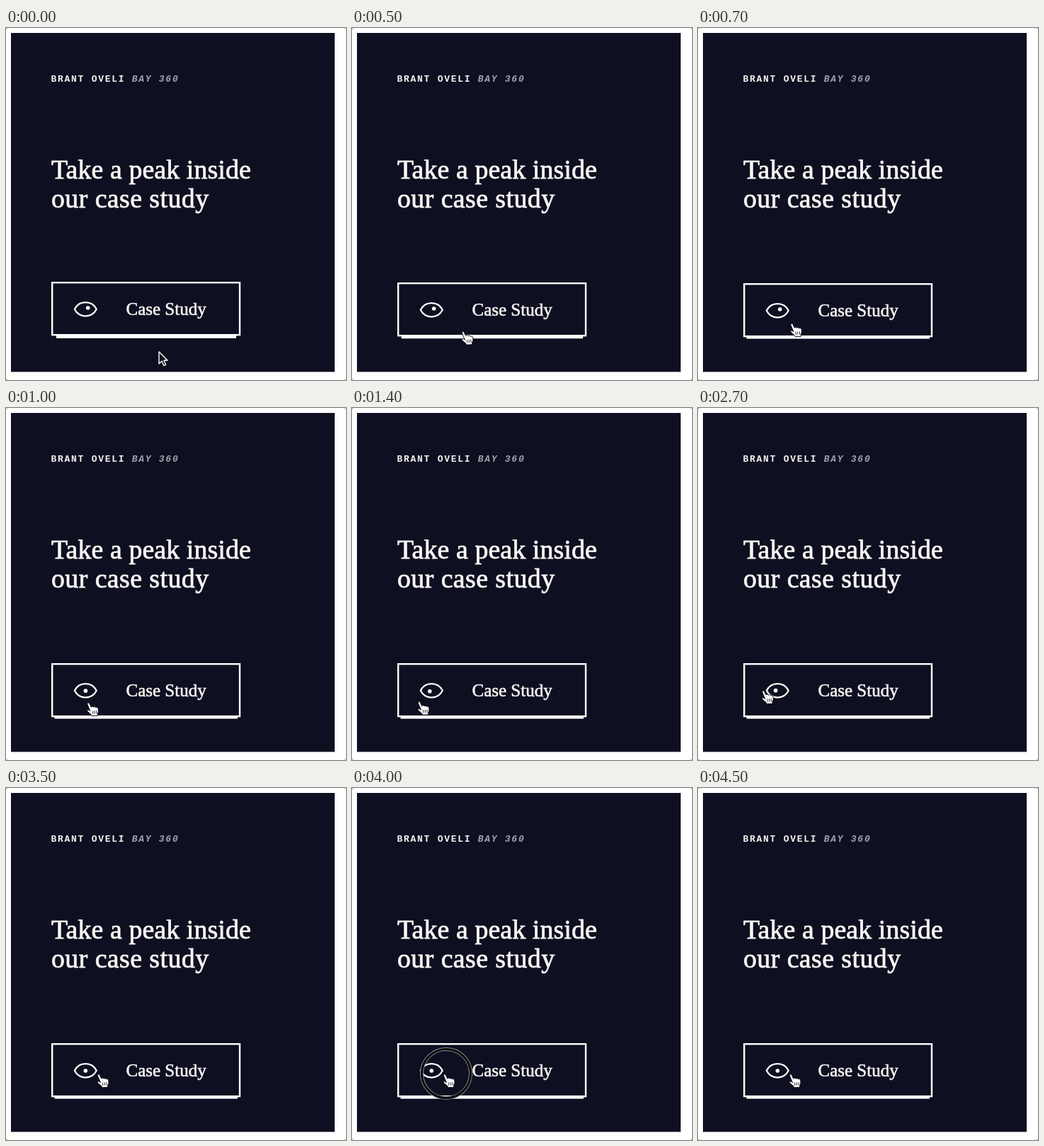
Write an HTML page that moves like this. It is 480 px wide and 498 px high and loops after 4.8 s.

```html
<!DOCTYPE html>
<html lang="en">
<head>
<meta charset="utf-8">
<title>Case study button</title>
<style>
  html, body { margin: 0; width: 100%; height: 100%; overflow: hidden; background: #b4b4b4; }
  svg { display: block; width: 100vw; height: 100vh; }
  text { fill: #f7f5f3; }
  .tag { font: 700 13px "Liberation Mono", "Courier New", monospace; letter-spacing: 1.72px; }
  .tag .sub { font-style: italic; fill: #a3a3ae; }
  .title, .label { font-family: "Liberation Serif", "Times New Roman", serif; stroke: #f7f5f3; }
  .title { font-size: 37.8px; stroke-width: .8; letter-spacing: .12px; }
  .title.second { letter-spacing: .45px; }
  .label { font-size: 25px; stroke-width: .6; }
</style>
</head>
<body>
<svg viewBox="0 0 480 498">
  <rect width="480" height="498" rx="4" fill="#fff"/>
  <rect x="7" y="7" width="457" height="479.5" fill="#0e0f20"/>

  <text class="tag" x="63.5" y="76" xml:space="preserve">BRANT OVELI <tspan class="sub">BAY 360</tspan></text>
  <text class="title" x="64" y="212.5">Take a peak inside</text>
  <text class="title second" x="64" y="254">our case study</text>

  <rect id="shade" y="435" fill="#fff"/>
  <g id="button">
    <rect x="65.2" y="360.2" width="264.8" height="74" fill="#0e0f20" stroke="#fff" stroke-width="2.4"/>
    <text class="label" x="169.5" y="405.5">Case Study</text>
    <g transform="translate(112.3 397.8)">
      <path d="M-15.5 0C-9-13 9-13 15.5 0C9 13-9 13-15.5 0Z" fill="none" stroke="#fff" stroke-width="2.2" stroke-linejoin="round"/>
      <circle id="pupil" r="2.8" fill="#fff"/>
    </g>
  </g>

  <g id="ring" fill="none">
    <circle cx="133" cy="404" r="34.5" stroke="#8d8d96" stroke-width="5"/>
    <circle cx="133" cy="404" r="34.5" stroke="#000" stroke-width="3"/>
  </g>

  <g id="cursor">
    <path id="arrow" d="M0 0V17L4 13.2 6.8 19.6 9.6 18.4 6.9 12.2H12Z" fill="#0c0c14" stroke="#fff" stroke-width="1.4" stroke-linejoin="round"/>
    <g id="hand" transform="scale(1.1 1)" stroke="#08080f" stroke-linejoin="round" stroke-linecap="round">
      <path d="M.3 1.8C0-.2 2.4-.6 3 1L5.2 6.2C6 4.8 8 5 8.2 6.4C9 5.2 11 5.6 11.2 7C12 6.2 14 6.6 14.2 8.4C14.8 12 14.6 13.5 13.4 15V18.4L6 18.8 5.4 17C3.6 15 1.6 13.6 .4 12C-.6 10.4 1 9.4 2.4 10.4L3.8 11.6Z" fill="#fff" stroke-width=".9"/>
      <path d="M7 12V15.5M9.4 11.8V15.4M11.8 11.6V15.2" fill="none" stroke-width=".8"/>
    </g>
  </g>
</svg>
<script>
  const LOOP = 4800, STEP = 100, BUTTON_BOTTOM = 440;
  const $ = id => document.getElementById(id);

  // Where the pointer turns: time in ms, x, y
  const turns = [
    [0, 216, 458], [700, 130.5, 418], [1400, 93, 415.5], [1800, 88, 412],
    [2100, 86, 376.5], [2600, 88, 384], [3100, 88, 384], [3500, 129, 405]
  ];

  const ramp = (t, from, to) => Math.min(1, Math.max(0, (t - from) / (to - from)));
  const mix = (a, b, k) => a + (b - a) * k;

  function pointer(t) {
    const i = Math.max(1, turns.findIndex(turn => turn[0] >= t));
    const [a, b] = t > 3500 ? turns.slice(-2) : [turns[i - 1], turns[i]];
    const k = ramp(t, a[0], b[0]);
    const dip = Math.sin(Math.PI * ramp(t, 2600, 3100));
    return [mix(a[1], b[1], k) + 4 * dip, mix(a[2], b[2], k) + 27 * dip];
  }

  function set(id, attrs) {
    for (const name in attrs) $(id).setAttribute(name, attrs[name]);
  }

  const move = (id, x, y) => set(id, { transform: `translate(${x} ${y})` });
  const show = (id, on) => set(id, { visibility: on ? "visible" : "hidden" });

  function draw(time) {
    const t = Math.floor((time % LOOP) / STEP) * STEP;
    const [x, y] = pointer(t);
    const over = y < BUTTON_BOTTOM;
    const hover = ramp(t, 300, 700);
    const look = ramp(t, 700, 1100);

    move("button", 0, 2 * hover);
    set("shade", { x: 71 - 2.5 * hover, width: 254 + 4.5 * hover, height: 4 + .6 * hover });

    // The eye rests up and right, then follows the pointer.
    move("pupil", mix(3.4, (x - 129) * .07, look), mix(-1.8, (y - 402) * .07, look));

    move("cursor", x, y);
    show("arrow", !over);
    show("hand", over);
    set("ring", { opacity: ramp(t, 3800, 4000) - ramp(t, 4100, 4500) });
  }

  const start = performance.now();
  function tick() {
    draw(performance.now() - start);
    requestAnimationFrame(tick);
  }
  tick();
</script>
</body>
</html>
```
